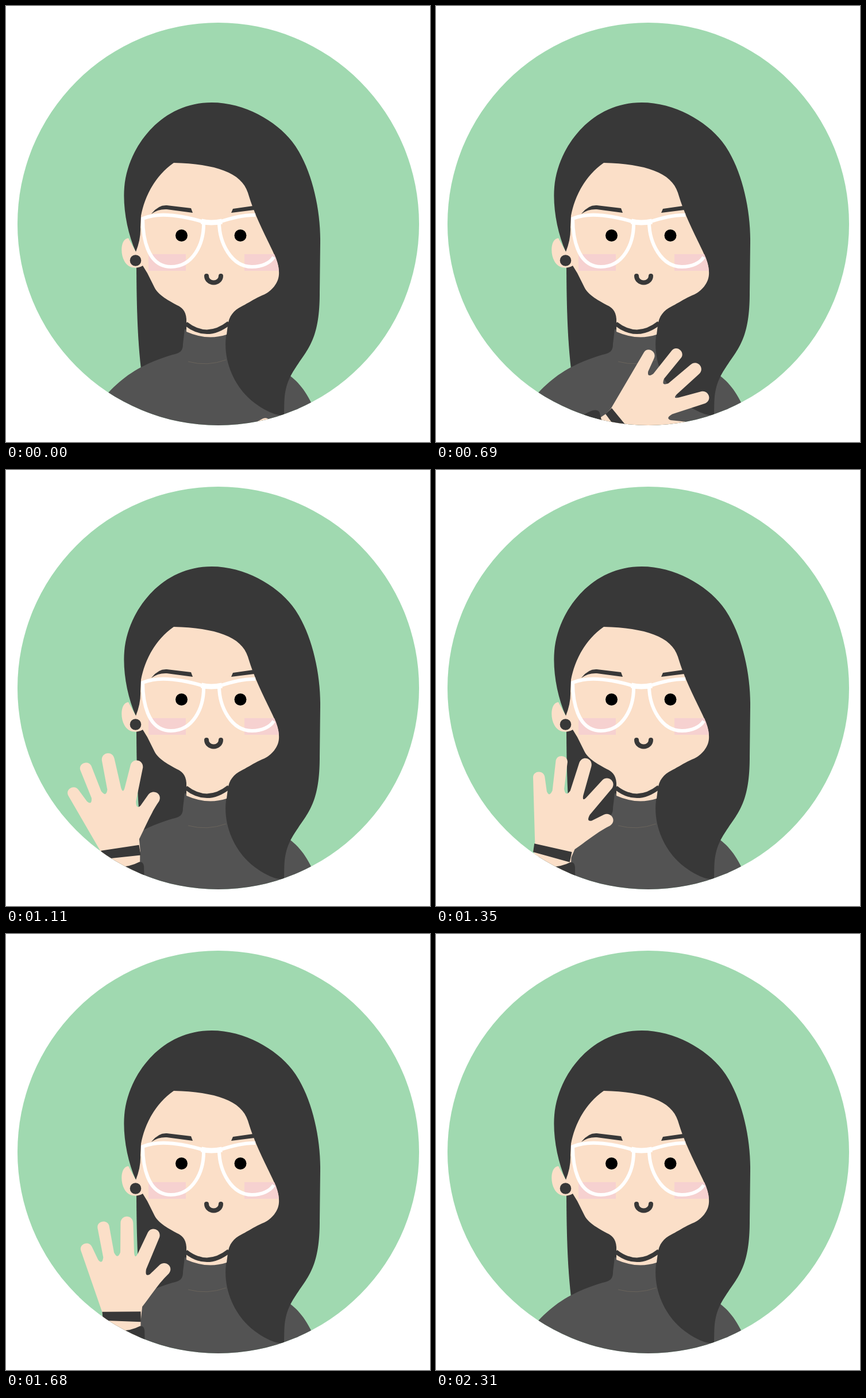
Animation, 738 px wide and 759 px high, one loop 3600 ms. Source, as an HTML page:

```html
<!DOCTYPE html>
<html lang="en">
<head>
<meta charset="utf-8">
<title>Waving avatar</title>
<style>
  html, body { margin: 0; width: 100%; height: 100%; overflow: hidden; background: #fff; }
  svg { display: block; width: 100%; height: 100%; }
  .skin { fill: #fbdfc8; }
  .dark { fill: #383838; }
  .shirt { fill: #535353; }
  .blush { fill: #f6d1d0; }
  .line { fill: none; stroke: #383838; }
  .glasses { fill: none; stroke: #fff; stroke-width: 6; }
</style>
</head>
<body>
<svg viewBox="0 0 738 759">
  <clipPath id="disc"><ellipse cx="369.5" cy="379.5" rx="349.5" ry="350.5"/></clipPath>
  <g clip-path="url(#disc)">
    <rect width="738" height="759" fill="#a0d9b0"/>

    <!-- back hair and sweater -->
    <path class="dark" d="M227 440C227 520 229 580 235 632L320 612V500Z"/>
    <path class="shirt" d="M170 682C200 648 230 625 290 607C304 604 308 600 308 588L311 563L386 566L392 610L485 637C508 652 520 668 532 692L500 760H200Z"/>
    <path d="M317 619Q350 628 383 616" fill="none" stroke="#6a645c"/>

    <!-- front hair -->
    <path class="dark" d="M226 428C211 395 203 350 206 315C212 245 270 168 358 168C415 168 470 200 498 236C530 277 548 350 547 412L546 500C546 590 520 600 496 643C482 670 485 690 484 712C470 715 440 700 420 680C395 655 378 615 383 575L385 540L300 480Z"/>

    <!-- face, ear and neck -->
    <path class="skin" d="M292 273C365 275 410 290 421 325C433 365 448 392 460 418C472 442 476 455 475 468C474 483 462 496 450 502C435 508 420 518 410 523C396 530 388 540 386 556L384 572Q350 583 314 567V545C313 530 305 524 298 521C285 514 266 504 259 491L246 465L238 452C226 459 212 456 206 444C198 430 200 405 213 404L226 428Q235 405 234 385L235 365C240 338 255 299 292 273Z"/>
    <path class="line" stroke-width="7.500" d="M313 553Q350 582 388 552"/>
    <circle class="dark" cx="225.5" cy="443" r="9.8"/>
    <path class="dark" d="M253 362Q265 346 280 347L322 352L325 360L280 354Q265 353 253 362ZM392 360L395 353L430 348L432 355Z"/>
    <path class="blush" d="M248 432H313V461H248ZM415 432H467Q474 447 475 461H415Z"/>
    <g class="glasses">
      <path d="M238 370C238 400 245 454 287 454C325 454 345 415 344 376C300 363 262 360 238 370Z"/>
      <path d="M434 364C415 363 395 368 371 376C371 412 392 454 428 454C446 454 460 447 466 437"/>
      <path d="M340 375Q357 379 376 375" stroke-width="9"/>
    </g>
    <circle cx="305.5" cy="399.5" r="10.5"/>
    <circle cx="408" cy="399.5" r="10.5"/>
    <path class="line" stroke-width="8" stroke-linecap="round" d="M349 470A12.5 11.5 0 0 0 374 470"/>

    <g id="arm">
      <path class="skin" d="M167 662H232V700H167Z"/>
      <path id="hand" class="skin" d="M165 657L131.500 549C128 537 146 531 151 543L161 566Q168 575 170 562L162 512C159 498 179 495 182 507L189 554Q195 567 200 554L202 504C202 488 224 488 224 504V556Q225 568 231 556L249 521C255 510 273 516 269 530L244 585Q241 599 250 594L268 578C278 570 293 582 283 594C265 610 250 632 235 650L232 672H166Z"/>
      <path id="bracelet" class="dark" d="M165 657L232 658V676L166 672Z"/>
      <path class="dark" d="M147 711Q147 682 159 683Q199 699 231 682Q238 681 239 690L241 746H147Z"/>
    </g>
  </g>
</svg>
<script>
const LOOP = 3600, STEP = 30;
const ELBOW = '199 812', WRIST = '199 666';
const [arm, hand, bracelet] = ['arm', 'hand', 'bracelet'].map(id => document.getElementById(id));

const progress = (t, from, to) => Math.min(1, Math.max(0, (t - from) / (to - from)));
const smooth = u => u * u * (3 - 2 * u);

// The forearm swings up from the right, drifts slightly, then drops to the left.
function armAngle(t) {
  const enter = 88 * (1 - progress(t, 300, 880) ** 2.6);
  const drift = 1.5 * Math.sin(Math.PI * progress(t, 1010, 1900));
  const leave = -58 * progress(t, 2030, 2310) ** 2;
  return enter + drift + leave;
}

// The hand bends back on arrival, then waves with a fading amplitude.
function waveAngle(t) {
  if (t < 1010) return -9 - 23 * smooth(progress(t, 880, 1010));
  const fade = (1 - progress(t, 1010, 1900)) ** 1.5;
  return -32 * fade * Math.cos(Math.PI * (t - 1010) / 300);
}

const rotate = (part, angle, pivot) => part.setAttribute('transform', `rotate(${angle} ${pivot})`);

function draw(now) {
  const t = Math.floor((now % LOOP) / STEP) * STEP;
  const wave = waveAngle(t);
  rotate(arm, armAngle(t), ELBOW);
  rotate(hand, wave, WRIST);
  rotate(bracelet, wave * 0.75, WRIST);
}

const start = performance.now();
function tick() {
  draw(performance.now() - start);
  requestAnimationFrame(tick);
}
tick();
</script>
</body>
</html>
```
